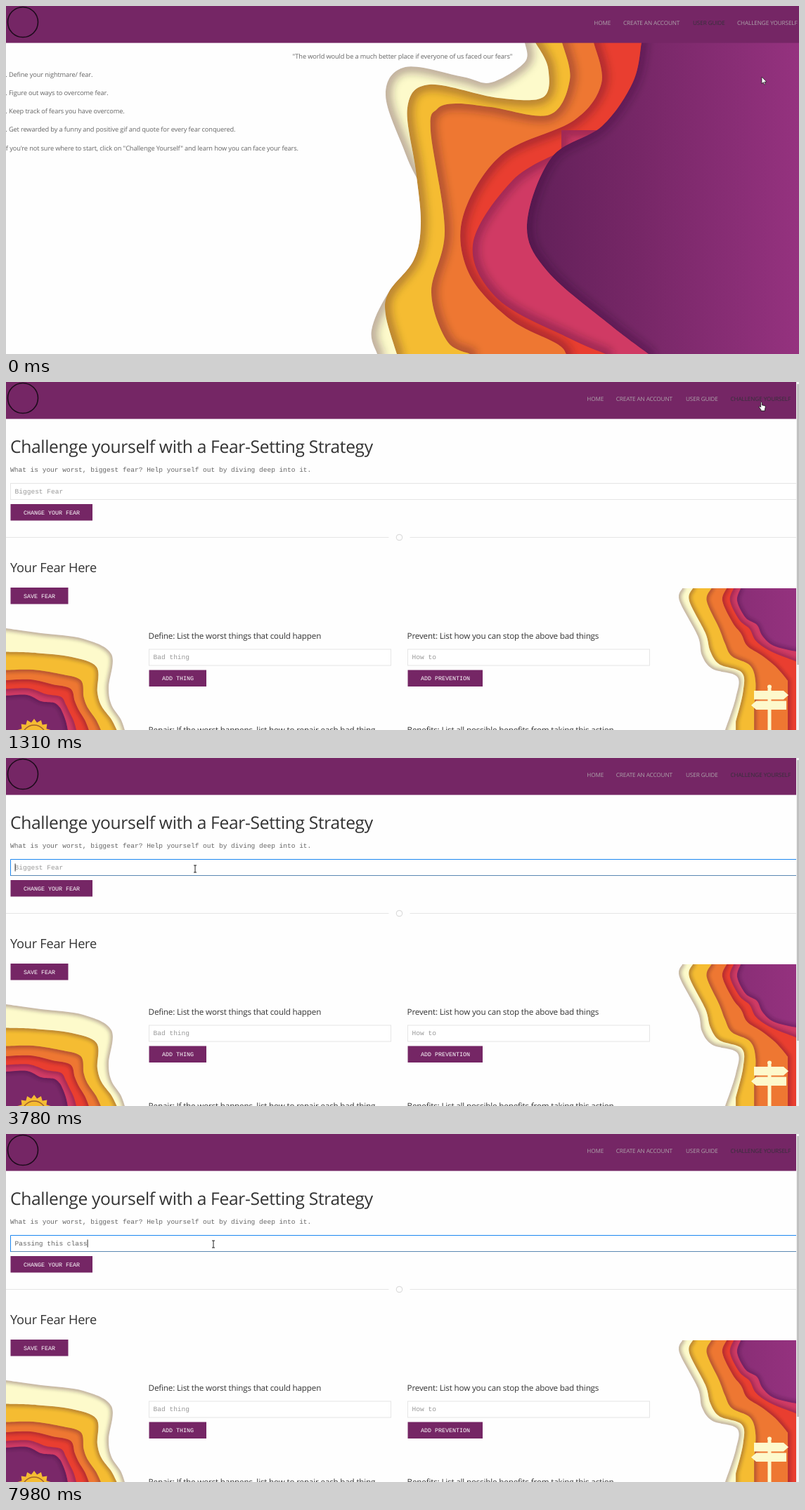
An HTML page for the animation above (8000 ms loop, 1128 by 496 pixels).

```html
<!DOCTYPE html>
<html lang="en">
<head>
<meta charset="utf-8">
<title>Fear-setting strategy</title>
<style>
  html, body { margin: 0; width: 100%; height: 100%; overflow: hidden; background: #fff; }
  svg { display: block; width: 1128px; height: 496px; }
  text { font-family: "Open Sans", "Noto Sans", sans-serif; letter-spacing: -.0135em; text-rendering: geometricPrecision; white-space: pre; }
  .mono { font-family: "Liberation Mono", "DejaVu Sans Mono", monospace; letter-spacing: 0; }
</style>
</head>
<body>
<svg id="stage" viewBox="0 0 1128 496" xmlns="http://www.w3.org/2000/svg"></svg>
<script>
const LOOP = 8000;
const CHAR = 5.72;
const BRAND = '#752665', NAV = '#ada3aa', ACTIVE = '#36303a';
const INK = '#333', BODY = '#666', FAINT = '#999', LINE = '#e5e5e5';
const LAYER_FILLS = ['#fdfacb', '#f5bc32', '#ee7732', '#e93e30', '#d03a64'];

// ---------- drawing helpers ----------
const text = (x, y, str, size, fill = BODY, attrs = '') =>
  `<text x="${x}" y="${y}" font-size="${size}" fill="${fill}" ${attrs}>${str}</text>`;
const mono = (x, y, str, fill = BODY, size = 9.53, attrs = '') =>
  text(x, y, str, size, fill, `class="mono" ${attrs}`);
const rect = (x, y, w, h, fill, attrs = '') =>
  `<rect x="${x}" y="${y}" width="${w}" height="${h}" fill="${fill}" ${attrs}/>`;
const button = (x, y, w, label) =>
  rect(x, y, w, 23.5, BRAND) + mono(x + 18.5, y + 14.6, label, '#fff', 8.35);
const field = (x, y, w, hint, id = '') =>
  rect(x + .5, y + .5, w, 23, '#fff', `stroke="${LINE}"`) +
  mono(x + 6.6, y + 14.8, hint, FAINT, 9.53, id);
const mix = (a, b, k) => a + (b - a) * k;

// Smooth curve through a flat list of x, y values.
function spline(flat) {
  const pts = [];
  for (let i = 0; i < flat.length; i += 2) pts.push([flat[i], flat[i + 1]]);
  const at = i => pts[Math.max(0, Math.min(pts.length - 1, i))];
  let d = `L${pts[0]}`;
  for (let i = 0; i < pts.length - 1; i++) {
    const [a, b, c, e] = [at(i - 1), at(i), at(i + 1), at(i + 2)];
    const c1 = [0, 1].map(k => b[k] + (c[k] - a[k]) / 6);
    const c2 = [0, 1].map(k => c[k] - (e[k] - b[k]) / 6);
    d += `C${c1} ${c2} ${c}`;
  }
  return d;
}

const openRight = p => {
  const top = p[1] - 30;
  return `M${p[0]},${top}${spline(p)}L${p.at(-2)},560L1300,560L1300,${top}Z`;
};
const openLeft = p => `M-60,${p[1]}${spline(p)}L${p.at(-2)},560L-60,560Z`;

// Layers between two edges; the spacing shifts from the first point to the last.
const between = (outer, inner, head, tail) => head.map((h, n) =>
  outer.map((v, i) => mix(v, inner[i], mix(h, tail[n], (i >> 1) / (outer.length / 2 - 1)))));

// Stacked paper cut-outs, each with a soft shadow along its inner edge.
let clipCount = 0;
const paperCut = (layers, close, core, shade) => layers.map((points, i) => {
  const d = close(points), id = `cut${clipCount++}`;
  return `<clipPath id="${id}"><path d="${d}"/></clipPath>
    <g clip-path="url(#${id})"><path d="${d}" fill="${LAYER_FILLS[i] || core}"/>
    <path d="${d}" fill="none" stroke="#2a1030" stroke-opacity=".3" stroke-width="${shade}" filter="url(#soft${shade})"/></g>`;
}).join('');

// ---------- artwork ----------
const cream = [738,52, 738,80, 690,109, 650,101, 568,87, 540,127, 570,215, 610,320, 545,407, 520,462, 528,496];
const yellow = [753,52, 771,88, 764,130, 700,131, 602,112, 571,145, 583,235, 590,310, 580,362, 545,407, 540,440, 556,496];
const orange = [791,52, 802,105, 773,155, 690,144, 640,139, 613,147, 604,178, 624,320, 605,408, 627,477, 660,496];
const red = [836,52, 847,110, 808,163, 705,212, 650,300, 658,380, 715,445, 783,481, 797,496];
const pink = [790,207, 720,249, 664,340, 700,418, 800,473, 853,496];
const purple = [904,52, 892,108, 848,171, 776,216, 741,312, 770,378, 860,455, 914,496];
const wave = [cream, yellow, orange, red, pink, purple];

const rightWave = between(
  [962,294, 958,312, 984,362, 990,390, 1005,409, 1040,420, 1038,450, 1023,496],
  [1045,294, 1040,312, 1052,336, 1068,346, 1076,362, 1092,376, 1124,384, 1160,388],
  [0, .18, .5, .76, .88, 1], [0, .11, .3, .65, .85, 1]);
const leftWave = between(
  [0,351, 50,358, 110,366, 150,388, 146,435, 150,460, 163,480, 169,496],
  [0,447, 30,446, 50,455, 68,457, 76,463, 80,470, 85,483, 88,496],
  [0, .35, .62, .77, .9, 1], [0, .14, .42, .63, .85, 1]);

const sunRays = Array.from({ length: 32 }, (_, i) => {
  const a = i * Math.PI / 16, r = i % 2 ? 21 : 26;
  return [40 + r * Math.sin(a), 506 - r * Math.cos(a)].map(v => v.toFixed(1));
}).join(' ');
const sun = `<polygon points="${sunRays}" fill="#f5bc32"/>
  <circle cx="40" cy="506" r="17" fill="#f5bc32" stroke="#a0602f" stroke-width="1.5"/>`;
const signpost = `<g fill="#fdf9cc"><path d="M1083.5,437h5v60h-5z"/><circle cx="1086" cy="434.5" r="3"/>
  <path d="M1064,440h42l7,6.3l-7,6.2h-42z"/><path d="M1067,454.5h43v12.5h-43l-7,-6.2z"/></g>`;

// ---------- pages ----------
const NAV_ITEMS = ['HOME', 'CREATE AN ACCOUNT', 'USER GUIDE', 'CHALLENGE YOURSELF'];
const header = (width, xs, active, linkId) => rect(0, 0, width, 52.6, BRAND) +
  '<circle cx="24" cy="23" r="21.5" fill="none" stroke="#1d0b1b" stroke-width="1.6"/>' +
  NAV_ITEMS.map((s, i) => text(xs[i], 26.7, s, 8.2, i === active ? ACTIVE : NAV, i === 3 ? `id="${linkId}"` : '')).join('');

const steps = [
  'Define your nightmare/ fear.',
  'Figure out ways to overcome fear.',
  'Keep track of fears you have overcome.',
  'Get rewarded by a funny and positive gif and quote for every fear conquered.'
];
const guidePage = `<g id="guide">
  ${paperCut(wave, openRight, 'url(#plum)', 18)}
  ${header(1128, [836.3, 878, 977, 1040], 2, 'guideLink')}
  ${text(407.6, 75.2, '"The world would be a much better place if everyone of us faced our fears"', 9.25)}
  ${steps.map((s, i) => text(-5.9, 101.4 + 26 * i, `${i + 1}. ${s}`, 9.25)).join('')}
  ${text(-2.6, 205.8, 'If you\'re not sure where to start, click on "Challenge Yourself" and learn how you can face your fears.', 9.25)}
</g>`;

const challengePage = `<g id="challenge">
  <clipPath id="rightView"><rect id="rightReveal" x="940" y="294" width="184" height="202"/></clipPath>
  <clipPath id="leftView"><rect id="leftReveal" x="0" y="345" width="180" height="151"/></clipPath>
  <g clip-path="url(#rightView)">${paperCut(rightWave, openRight, 'url(#plum)', 7)}${signpost}</g>
  <g clip-path="url(#leftView)">${paperCut(leftWave, openLeft, '#7a2869', 7)}${sun}</g>
  ${header(1124, [826.3, 867.7, 967, 1030.5], 3, 'pageLink')}
  ${text(6, 101.4, 'Challenge yourself with a Fear-Setting Strategy', 24.6, INK)}
  ${mono(6, 127.8, 'What is your worst, biggest fear? Help yourself out by diving deep into it.')}
  ${field(6, 144, 1140, 'Biggest Fear', 'id="entry"')}
  <path id="focusTop" d="M6.5,168V144.5H1124" fill="none" stroke="#1e87f0"/>
  <path id="focusBottom" d="M7,167.5H1124" stroke="#5b88b3"/>
  <rect id="caret" y="150.5" width="1" height="11" fill="#333"/>
  ${button(6.5, 174, 116.5, 'CHANGE YOUR FEAR')}
  <path d="M0,221.5H544.5M574.5,221.5H1124" stroke="${LINE}"/>
  <circle cx="559.5" cy="221.5" r="4.2" fill="none" stroke="#dcdcdc" stroke-width="1.2"/>
  ${text(6, 271.2, 'Your Fear Here', 18.2, INK)}
  ${button(6.5, 293, 82, 'SAVE FEAR')}
  ${text(202.6, 365.5, 'Define: List the worst things that could happen', 11.63, INK)}
  ${text(570.6, 365.5, 'Prevent: List how you can stop the above bad things', 11.63, INK)}
  ${field(203, 380.5, 344, 'Bad thing')}
  ${field(571, 380.5, 344, 'How to')}
  ${button(203.5, 410.5, 81.5, 'ADD THING')}
  ${button(571.5, 410.5, 106.5, 'ADD PREVENTION')}
  ${text(202.6, 500, 'Repair: If the worst happens, list how to repair each bad thing', 11.63, INK)}
  ${text(570.6, 500, 'Benefits: List all possible benefits from taking this action', 11.63, INK)}
  ${rect(1124, 0, 4, 496, '#f1f1f1')}
  ${rect(1125, 3, 3, 400, '#c1c1c1')}
</g>`;

const cursors = `<g id="cursor">
  <path id="arrow" d="M0,0V9.8L2.3,7.7L3.8,11.2L5.3,10.5L3.8,7.2H7Z" fill="#fff" stroke="#111" stroke-width=".7"/>
  <path id="hand" d="M-.9,.8Q0,-.6 .9,.8V4.4L4.6,5.2Q6,5.5 5.8,7.2L5,10.3V12.6H-.6V11L-3.4,7.4Q-3.6,6 -2.2,6.3L-.9,7.6Z" fill="#fff" stroke="#111" stroke-width=".8"/>
  <path id="beam" d="M-2,-5H2M0,-5V5M-2,5H2" fill="none" stroke="#222"/>
</g>`;

const blur = (size, amount) =>
  `<filter id="soft${size}" filterUnits="userSpaceOnUse" x="-80" y="0" width="1400" height="600"><feGaussianBlur stdDeviation="${amount}"/></filter>`;
document.getElementById('stage').innerHTML = `<defs>${blur(18, 6)}${blur(7, 2.5)}
  <linearGradient id="plum" gradientUnits="userSpaceOnUse" x1="740" y1="0" x2="1128" y2="0">
    <stop offset="0" stop-color="#622059"/><stop offset=".42" stop-color="#772767"/><stop offset="1" stop-color="#95327f"/>
  </linearGradient></defs>${rect(0, 0, 1128, 496, '#fefefe')}${guidePage}${challengePage}${cursors}`;

// ---------- timeline ----------
const FRAME = 77;
const stops = [
  [0, 1075, 101, 'arrow'], [70, 1075, 72, 'arrow'], [150, 1074, 42, 'arrow'], [230, 1074, 30, 'arrow'],
  [380, 1074.5, 28.5, 'hand'],
  [2630, 1019, 63, 'arrow'], [2700, 905, 118, 'arrow'], [2780, 710, 190, 'arrow'], [2860, 525, 225, 'arrow'],
  [2940, 400, 212, 'arrow'], [3010, 320, 182, 'arrow'], [3090, 278, 161, 'beam'], [3170, 269, 158, 'beam']
];
const phrase = 'Passing this class';
const keyTimes = [5650, 5780, 6030, 6180, 6250, 6330, 6410, 6560, 6880, 6960, 6960, 7110, 7190, 7510, 7660, 7730, 7810, 7980];
const blinkTimes = [3630, 4250, 4710, 5170, 5650];

const el = id => document.getElementById(id);
const show = (id, on) => el(id).setAttribute('visibility', on ? 'visible' : 'hidden');
const passed = (times, t) => times.filter(v => v <= t).length;

function render(t) {
  const onGuide = t < 1080;
  el('guide').style.display = onGuide ? '' : 'none';
  el('challenge').style.display = onGuide ? 'none' : '';
  el('guideLink').setAttribute('fill', t < 230 ? NAV : t < 780 ? '#6b636a' : t < 860 ? '#574f58' : '#4b434c');

  el('rightReveal').setAttribute('height', t < 1160 ? 42 : 202);
  el('leftReveal').setAttribute('height', t < 1160 ? 0 : t < 1310 ? 51 : 151);

  const focus = Math.max(0, Math.min(1, (t - 3560) / 200));
  el('focusTop').setAttribute('opacity', focus);
  el('focusBottom').setAttribute('opacity', focus);

  const typed = passed(keyTimes, t);
  el('entry').textContent = typed ? phrase.slice(0, typed) : 'Biggest Fear';
  el('entry').setAttribute('fill', typed ? BODY : FAINT);
  el('caret').setAttribute('x', 12.6 + typed * CHAR);
  el('caret').setAttribute('opacity', typed || passed(blinkTimes, t) % 2 ? 1 : 0);

  const [, x, y, shape] = stops.findLast(s => s[0] <= t);
  const glide = Math.max(0, Math.min(5, Math.floor((t - 3860) / FRAME) + 1)) / 5;
  el('cursor').setAttribute('transform', `translate(${x + 26 * glide} ${y - Math.round(glide)})`);
  ['arrow', 'hand', 'beam'].forEach(id => show(id, id === shape));
}

const start = performance.now();
function tick() {
  render((performance.now() - start) % LOOP);
  requestAnimationFrame(tick);
}
tick();
</script>
</body>
</html>
```
